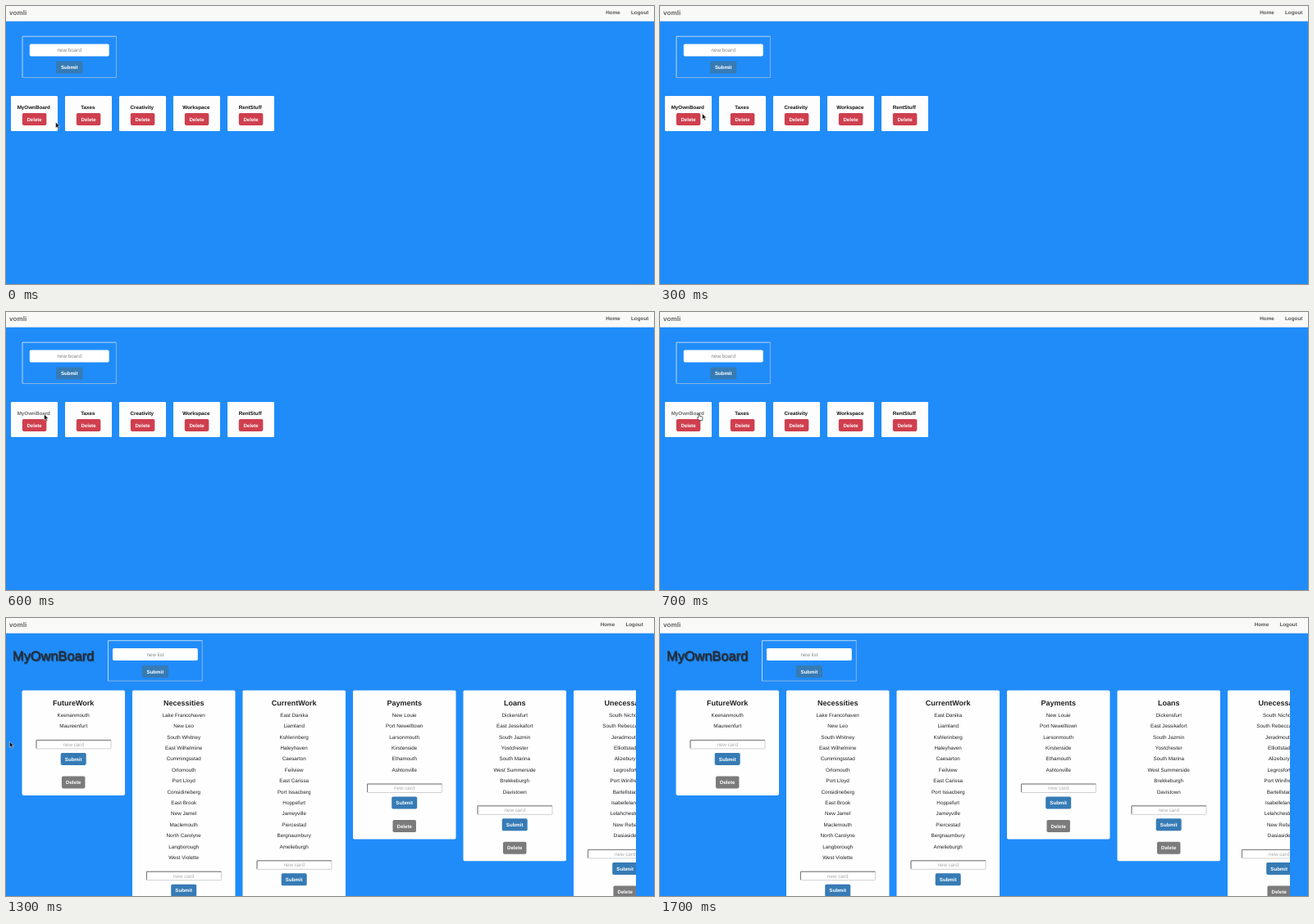
These frames come from a looping animation (790 px wide and 340 px high, 3.5 s). An HTML page:

```html
<!DOCTYPE html>
<html lang="en">
<head>
<meta charset="utf-8">
<title>Boards</title>
<style>
html, body { margin: 0; width: 100%; height: 100%; overflow: hidden; background: #208cfa; }
svg { display: block; }
text { font-family: "Liberation Sans", Arial, sans-serif; text-rendering: geometricPrecision; }
</style>
</head>
<body>
<svg id="stage" width="790" height="340" viewBox="0 0 790 340"></svg>
<script>
const BLUE = "#367bb5", RED = "#cf3f4e", GRAY = "#7b7b7b";

const rect = (x, y, w, h, fill, extra = "") =>
  `<rect x="${x}" y="${y}" width="${w}" height="${h}" fill="${fill}" ${extra}/>`;

// y is the middle of the capital letters
const text = (s, x, y, size, fill, weight = 400, anchor = "middle", extra = "") =>
  `<text x="${x}" y="${y + size * 0.36}" font-size="${size}" fill="${fill}" font-weight="${weight}" text-anchor="${anchor}" ${extra}>${s}</text>`;

const button = (label, x, y, w, fill) =>
  rect(x - w / 2, y - 7.5, w, 15, fill, 'rx="1.8"') + text(label, x, y, 6.1, "#fff", 700);

const form = (x, y, w, h, inset, label) => {
  const mid = x + w / 2;
  return `<path d="M${x} ${y + h}V${y}H${x + w}" fill="none" stroke="#b9d8f8"/>` +
    `<path d="M${x} ${y + h}H${x + w}V${y}" fill="none" stroke="#86b4e4"/>` +
    rect(x + inset, y + 9.3, w - 2 * inset, 15, "#fff", 'rx="1.8"') +
    text(label, mid, y + 16.6, 6.3, "#858585") +
    button("Submit", mid, y + 37.8, 32.5, BLUE);
};

const header = shift =>
  rect(0, 0, 790, 18.5, "#f9f9f8") + rect(0, 18, 790, 0.6, "#dce4ea") +
  text("vomli", 4, 7.6, 8.1, "#666", 700, "start") +
  text("Home", 740 - shift, 7.6, 6.3, "#555", 700) +
  text("Logout", 772.7 - shift, 7.6, 6.3, "#555", 700);

const boards = ["MyOwnBoard", "Taxes", "Creativity", "Workspace", "RentStuff"];
const board = (name, i) => {
  const x = 6 + 66 * i;
  return rect(x, 110, 57, 43, "#fdfdfd", 'rx="1.3"') +
    text(name, x + 27.8, 123.8, 6.25, "#111", 700, "middle", i ? "" : 'id="first"') +
    button("Delete", x + 28.6, 138.4, 29.5, RED);
};

const lists = {
  FutureWork: "Keenanmouth,Maureenfurt",
  Necessities: "Lake Francohaven,New Leo,South Whitney,East Wilhelmine,Cummingsstad,Orlomouth,Port Lloyd,Considineberg,East Brook,New Jamel,Maclemouth,North Carolyne,Langborough,West Violette",
  CurrentWork: "East Danika,Liamland,Kshlerinberg,Haleyhaven,Caesarton,Feilview,East Carissa,Port Issacberg,Hoppefurt,Jameyville,Piercestad,Bergnaumbury,Amelieburgh",
  Payments: "New Louie,Port Newelltown,Larsonmouth,Kirstenside,Ethamouth,Ashtonville",
  Loans: "Dickensfurt,East Jessikafort,South Jazmin,Yostchester,South Marina,West Summerside,Brekkeburgh,Davistown",
  Unecessary: "South Nichola,South Rebeccastad,Jeradmouth,Elliottstad,Alizebury,Legrosfort,Port Winifred,Bartellstad,Isabelleland,Lelahchester,New Reba,Dasiaside"
};
const list = ([name, items], i) => {
  const x = 19.5 + 134.5 * i, mid = x + 62.7, rows = items.split(",");
  const end = 118.6 + 13.4 * rows.length;
  return rect(x, 88.5, 125.5, end - 17, "#fefefe", 'rx="1.8"') +
    text(name, mid, 104, 9, "#222", 700) +
    rows.map((s, k) => text(s, mid, 118.6 + 13.4 * k, 6.3, "#222")).join("") +
    rect(x + 17.5, end + 4, 91, 10.5, "#fff", 'stroke="#c4c4c4" stroke-width=".8" rx=".8"') +
    `<path d="M${x + 17.5} ${end + 14}v-10h91" fill="none" stroke="#6c6c6c" stroke-width=".9"/>` +
    text("new card", mid, end + 9.2, 6.3, "#aaa") +
    button("Submit", mid, end + 27, 31, BLUE) +
    button("Delete", mid, end + 55.5, 28.5, GRAY);
};

const title = (x, y, fill) => text("MyOwnBoard", x, y, 16.4, fill, 400, "start", `stroke="${fill}" stroke-width=".4"`);

const stage = document.getElementById("stage");
stage.innerHTML = `
<clipPath id="clip"><rect width="768" height="340"/></clipPath>
${rect(0, 0, 790, 340, "#208cfa")}
<g id="home">${header(0)}${form(20, 37.2, 114.5, 50.3, 8.8, "new board")}${boards.map(board).join("")}</g>
<g id="detail">${header(6.6)}${title(8.8, 46.9, "#174f87")}${title(8, 46.1, "#262b31")}
${form(124.5, 27.7, 114.8, 49.3, 5.5, "new list")}
<g clip-path="url(#clip)">${Object.entries(lists).map(list).join("")}</g></g>
<path id="arrow" d="M0 0V7.2L1.7 5.7L2.9 8.4L4.2 7.8L3 5.2H5.2Z" fill="#111" stroke="#fff" stroke-width=".5"/>
<path id="hand" d="M1.8 .5q.8-.6 1.3 .4V3.2L6.4 4q.8 .3.7 1.2L6.5 8.6H2.7L.3 5.4q.1-.9 1.5-.2Z" fill="#fff" stroke="#222" stroke-width=".7"/>
<path id="beam" d="M-1.5 0H1.5M0 0V8M-1.5 8H1.5" fill="none" stroke="#333" stroke-width=".7"/>`;

const el = id => document.getElementById(id);
const show = (id, on) => el(id).setAttribute("visibility", on ? "visible" : "hidden");

// start time, cursor, x, y
const pointer = [
  [0, "arrow", 60.5, 142], [100, "arrow", 57.5, 139.5], [200, "arrow", 53.7, 135],
  [300, "arrow", 51.5, 131.5], [400, "arrow", 49.5, 128.5], [500, "arrow", 48, 126.5],
  [600, "arrow", 46.5, 125], [700, "hand", 45, 124], [1200, "arrow", 41.3, 123.7],
  [1300, "arrow", 4.3, 151], [1400, "beam", 499.5, 134], [1700, "none", 0, 0]
];

function draw(now) {
  const t = now % 3500;
  const [, kind, x, y] = pointer.findLast(p => p[0] <= t);
  show("home", t < 1300);
  show("detail", t >= 1300);
  el("first").setAttribute("fill", t < 600 ? "#111" : "#6a6a6a");
  for (const id of ["arrow", "hand", "beam"]) {
    show(id, id === kind);
    el(id).setAttribute("transform", `translate(${x} ${y})`);
  }
}

let start;
function tick(now) {
  start ??= now;
  draw(now - start);
  requestAnimationFrame(tick);
}
draw(0);
requestAnimationFrame(tick);
</script>
</body>
</html>
```
